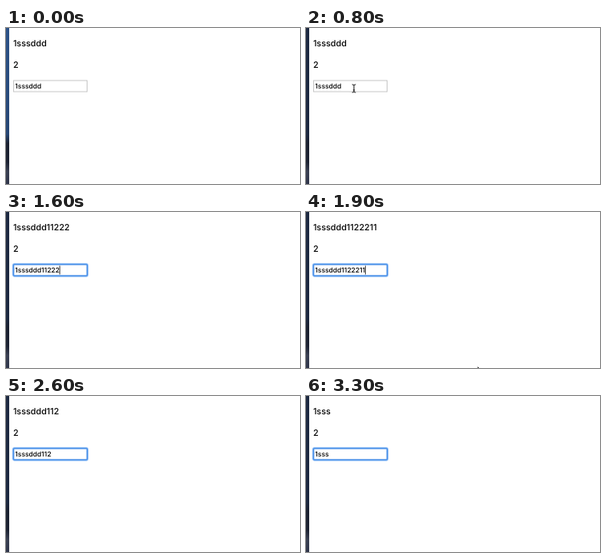
An HTML page that plays this animation: 368x196 px, repeating every 3.4 s.

```html
<!DOCTYPE html>
<html lang="en">
<head>
<meta charset="utf-8">
<title>Bound input</title>
<style>
html, body { margin: 0; width: 100%; height: 100%; overflow: hidden; background: #fff; }
svg { display: block; width: 368px; height: 196px; }
text { font-family: Inter, "Liberation Sans", sans-serif; font-weight: 500; fill: #000; text-rendering: geometricPrecision; }
.para { font-size: 10.8px; }
.field { font-size: 8.5px; }
</style>
</head>
<body>
<svg viewBox="0 0 368 196">
  <defs>
    <linearGradient id="desk" x2="0" y2="1">
      <stop id="deskTop" offset="0"/>
      <stop id="deskMid" offset=".68"/>
      <stop offset=".74" stop-color="#1b2130"/>
      <stop offset=".86" stop-color="#1d2333"/>
      <stop offset=".92" stop-color="#3a4052"/>
      <stop offset="1" stop-color="#30364b"/>
    </linearGradient>
  </defs>
  <rect width="368" height="196" fill="#fff"/>
  <rect width="4" height="196" fill="url(#desk)"/>
  <text id="echo" class="para" x="8.9" y="23.4"></text>
  <text class="para" x="9" y="49.7">2</text>
  <rect id="border" x="9.5" y="66" width="92" height="14" fill="#fff" stroke="#c6c6c6"/>
  <g id="ring" fill="none">
    <rect x="8.7" y="65.2" width="93.6" height="15.6" rx="2" stroke="#8fbdf6" stroke-width="1.8"/>
    <rect x="9.5" y="66" width="92" height="14" rx="1" stroke="#4a90e8" stroke-width="1.6"/>
  </g>
  <text id="value" class="field" x="11.3" y="76"></text>
  <path id="caret" d="M0 67.5V78.5" stroke="#000" stroke-width=".8"/>
  <path id="arrow" d="M0 0V10.6L2.5 8.3L4.1 12L5.8 11.3L4.2 7.6H7.6Z" fill="#000" stroke="#fff" stroke-width=".7"/>
  <path id="beam" d="M-2.3 -5Q0 -5 0 -3.6Q0 -5 2.3 -5M0 -3.6V3.6M-2.3 5Q0 5 0 3.6Q0 5 2.3 5M-1.2 2H1.2" fill="none" stroke="#111" stroke-width="1"/>
</svg>
<script>
const LOOP = 3400, STEP = 100;
const FULL = "1sssddd11222111";
// [start in ms, number of characters]
const EDITS = [
  [0, 7], [1000, 8], [1200, 9],
  [1400, 10], [1500, 11], [1600, 12], [1700, 13], [1800, 14], [2000, 15],
  [2300, 14], [2400, 13], [2500, 12], [2600, 10], [2700, 8], [2800, 6], [2900, 5], [3000, 4]
];
const el = id => document.getElementById(id);
const show = (id, on) => el(id).setAttribute("visibility", on ? "visible" : "hidden");
const place = (id, x, y) => el(id).setAttribute("transform", `translate(${x} ${y})`);
const within = (t, a, b) => t >= a && t < b;

function pointer(t) {
  const p = Math.min(1, Math.max(0, (t - 100) / 500));
  const eased = p * p * (3 - 2 * p);
  const leaving = within(t, 1900, 2000);
  const x = leaving ? 214.5 : 222 - 162 * eased;
  const y = leaving ? 193.5 : 184 - 108 * eased;
  const overField = within(t, 600, 1000);
  show("arrow", within(t, 100, 600) || leaving);
  show("beam", overField);
  place(overField ? "beam" : "arrow", x, y);
}

function render(time) {
  const t = Math.floor((time % LOOP) / STEP) * STEP;
  const length = EDITS.filter(([start]) => start <= t).pop()[1];
  const typed = FULL.slice(0, length);
  el("echo").textContent = typed;
  el("value").textContent = typed;

  const focused = t >= 900;
  show("ring", focused);
  show("border", !focused);
  show("caret", within(t, 900, 2300) || within(t, 3100, 3300));
  place("caret", 11.5 + el("value").getComputedTextLength(), 0);

  el("deskTop").setAttribute("stop-color", t < 100 ? "#2c5288" : "#1e2a42");
  el("deskMid").setAttribute("stop-color", t < 100 ? "#264674" : "#1c2840");
  pointer(t);
}

const begin = performance.now();
function tick() {
  render(performance.now() - begin);
  requestAnimationFrame(tick);
}
tick();
</script>
</body>
</html>
```
